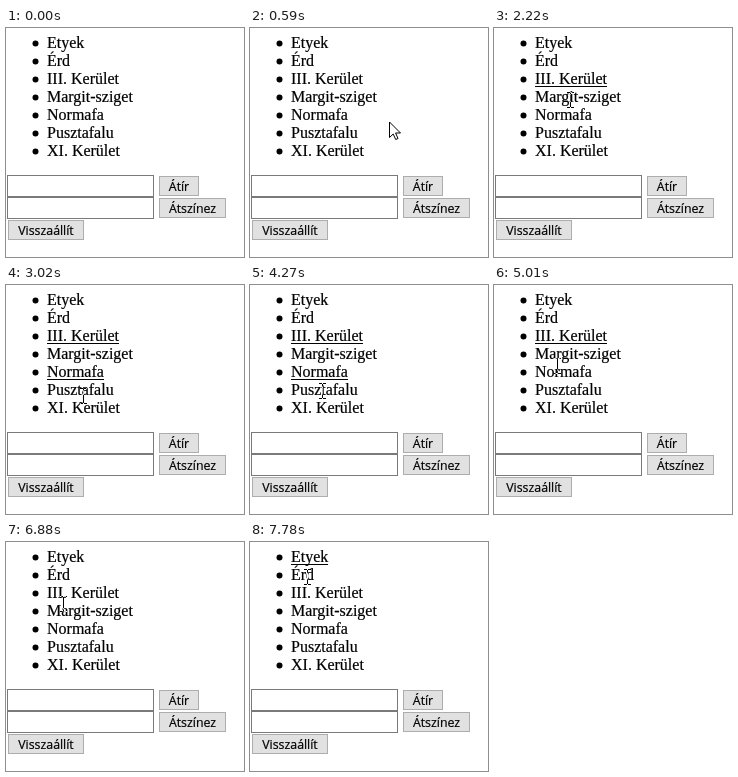
Recreate the animation shown at these times as an HTML page. Size 238 by 229 pixels, loop 8000 ms.

```html
<!DOCTYPE html>
<html lang="hu">
<head>
<meta charset="utf-8">
<style>
html, body { margin: 0; width: 100%; height: 100%; overflow: hidden; background: #fff; }
svg { display: block; width: 238px; height: 229px; isolation: isolate; }
text { stroke: #000; stroke-width: .2px; }
.item { font: 16px "Liberation Serif", serif; }
.label { font: 12.35px "Open Sans", sans-serif; text-anchor: middle; }
.field { fill: #fff; stroke: #7a7a7a; }
.button { fill: #e1e1e1; stroke: #adadad; }
#beam { fill: #fff; mix-blend-mode: difference; }
</style>
</head>
<body>
<svg viewBox="0 0 238 229">
  <rect width="238" height="229" fill="#fff"/>
  <g id="page"></g>
  <path id="beam" shape-rendering="crispEdges" d="M-3-8h3v1h-3zM1-8h3v1h-3zM0-7h1v14h-1zM-3 7h3v1h-3zM1 7h3v1h-3z"/>
  <path id="arrow" fill="#fff" stroke="#000" d="M.5 1V16.5L4.2 13 6.7 18.5 9 17.5 6.6 12H11.5Z"/>
</svg>
<script>
const LOOP = 8000, ROW = 18, TOP = 6, LEFT = 41;
const names = ["Etyek", "Érd", "III. Kerület", "Margit-sziget", "Normafa", "Pusztafalu", "XI. Kerület"];

// Pointer moves: start, end, x, y, and whether a click precedes the move
const origin = [221, 183];
const moves = [
  [20, 810, 120, 72, 0],
  [850, 1220, 75, 47, 0],
  [1800, 2550, 77, 90, 1],
  [2710, 3140, 77, 116, 1],
  [3370, 3480, 76, 115, 1],
  [4040, 4610, 65, 90, 1],
  [4870, 5190, 60, 68, 1],
  [5400, 5680, 54, 59, 1],
  [5700, 6200, 56, 51, 0],
  [6220, 6500, 57, 71, 1],
  [6700, 7450, 57, 13, 1],
  [7520, 7780, 57, 35, 1]
];

const $ = id => document.getElementById(id);
const show = (el, on) => el.setAttribute("visibility", on ? "visible" : "hidden");
const rowAt = y => Math.floor((y - TOP) / ROW);

function add(tag, attrs, text = "") {
  const el = document.createElementNS("http://www.w3.org/2000/svg", tag);
  for (const k in attrs) el.setAttribute(k, attrs[k]);
  el.textContent = text;
  return $("page").appendChild(el);
}

function box(kind, x, y, w, h) {
  add("rect", { class: kind, x: x + .5, y: y + .5, width: w - 1, height: h - 1 });
}

function button(text, x, y, w) {
  box("button", x, y, w, 20);
  add("text", { class: "label", x: x + w / 2, y: y + 15 }, text);
}

const items = names.map((name, i) => {
  const y = TOP + ROW * i;
  add("circle", { cx: 29.5, cy: y + 9.5, r: 3 });
  const text = add("text", { class: "item", x: LEFT, y: y + 14 }, name);
  const width = Math.round(text.getComputedTextLength());
  return { width, line: add("rect", { x: LEFT, y: y + 16, width, height: 1 }) };
});

box("field", 1, 147, 147, 22);
box("field", 1, 169, 147, 22);
button("Átír", 153, 148, 40);
button("Átszínez", 153, 170, 67);
button("Visszaállít", 2, 192, 76);

// Pointer place at time t, and the rows underlined by the clicks so far
function stateAt(t) {
  let [x, y] = origin;
  const marked = new Set();
  for (const [start, end, toX, toY, click] of moves) {
    if (t < start) break;
    const row = rowAt(y);
    if (click && !marked.delete(row)) marked.add(row);
    const k = Math.min(1, (t - start) / (end - start));
    const ease = k * k * (3 - 2 * k);
    x += (toX - x) * ease;
    y += (toY - y) * ease;
  }
  return { x: Math.round(x), y: Math.round(y), marked };
}

// The text cursor shows over words, the arrow beside and between them
function overText(x, y) {
  const item = items[rowAt(y)];
  return item && x >= LEFT && x < LEFT + item.width && (y - TOP) % ROW < ROW - 1;
}

function draw(t) {
  const { x, y, marked } = stateAt(t);
  const visible = t >= moves[0][0], text = overText(x, y);
  items.forEach((item, i) => show(item.line, marked.has(i)));
  show($("beam"), visible && text);
  show($("arrow"), visible && !text);
  for (const id of ["beam", "arrow"]) $(id).setAttribute("transform", `translate(${x} ${y})`);
}

const begin = performance.now();
function tick() {
  draw((performance.now() - begin) % LOOP);
  requestAnimationFrame(tick);
}
tick();
</script>
</body>
</html>
```
